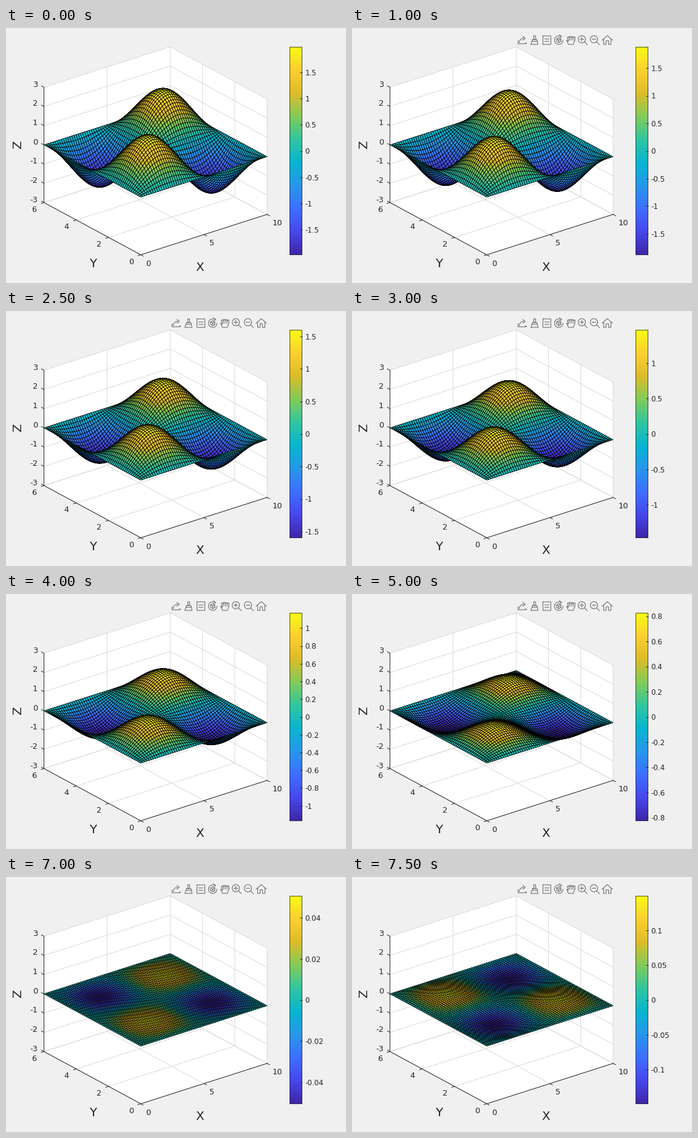
A matplotlib script that plays this animation: 560x420 px, repeating every 8000 ms.

```python
import numpy as np
import matplotlib.pyplot as plt
from matplotlib.animation import FuncAnimation
from matplotlib.collections import LineCollection, PolyCollection
from matplotlib.colors import LinearSegmentedColormap
from matplotlib.patches import Polygon, Rectangle

W, H, DPI = 560, 420, 100
PX = 72 / DPI                      # one pixel in points
FRAMES, INTERVAL = 16, 500
LX, LY, ZMAX, N = 10, 6, 3, 60
BG, INK, GRID, ICON = "#f0f0f0", "#262626", "#dadada", "#6e6e6e"

PARULA = LinearSegmentedColormap.from_list("parula", [
    "#3e26a8", "#4747eb", "#3e6fff", "#2797eb", "#08b5d0",
    "#31c69f", "#81cc59", "#dcbd29", "#fccf30", "#f9fb15"], N=256)

plt.rcParams["font.family"] = "DejaVu Sans"
fig = plt.figure(figsize=(W / DPI, H / DPI), dpi=DPI, facecolor=BG)
ax = fig.add_axes([0, 0, 1, 1])

# Orthographic projection: screen vectors of the three box edges
ORIGIN = np.array([222.0, 373.5])
EX = np.array([208.0, -66.5])
EY = np.array([-159.5, -86.0])
EZ = np.array([0.0, -190.0])


def project(x, y, z):
    x, y, z = (np.asarray(v, float)[..., None] for v in (x, y, z))
    return ORIGIN + x / LX * EX + y / LY * EY + (z + ZMAX) / (2 * ZMAX) * EZ


def line(points, color=INK, width=1.0, z=1):
    xs, ys = zip(*points)
    return ax.plot(xs, ys, color=color, lw=width * PX, zorder=z, snap=False,
                   solid_joinstyle="round")[0]


def edge(a, b, color=GRID, z=1):
    line([project(*a), project(*b)], color, 1, z)


def label(pos, text, size, ha="center"):
    """Text whose digits are centred vertically on pos."""
    return ax.text(pos[0], pos[1] + 0.365 * size, text, fontsize=size * PX,
                   color=INK, ha=ha, va="baseline", zorder=6)


def draw_box():
    lo, hi = -ZMAX, ZMAX
    floor = [(0, 0, lo), (LX, 0, lo), (LX, LY, lo), (0, LY, lo)]
    left = [(0, LY, lo), (LX, LY, lo), (LX, LY, hi), (0, LY, hi)]
    right = [(LX, 0, lo), (LX, LY, lo), (LX, LY, hi), (LX, 0, hi)]
    for wall in (floor, left, right):
        ax.add_patch(Polygon([project(*p) for p in wall], fc="white",
                             ec="none", zorder=0))
    unit_x, unit_y = (v / np.hypot(*v) for v in (EX, EY))

    def tick(p, step, text, offset, ha):
        line([p, p + 4.7 * step], z=2)
        label(p + offset, text, 13, ha)

    for x in (0, 5, 10):
        edge((x, 0, lo), (x, LY, lo))
        edge((x, LY, lo), (x, LY, hi))
        tick(project(x, 0, lo), -unit_y, str(x), (8.5, 13.5), "left")
    for y in (0, 2, 4, 6):
        edge((0, y, lo), (LX, y, lo))
        edge((LX, y, lo), (LX, y, hi))
        tick(project(0, y, lo), -unit_x, str(y), (-16, 10.5), "center")
    for z in range(lo, hi + 1):
        edge((0, LY, z), (LX, LY, z))
        edge((LX, 0, z), (LX, LY, z))
        tick(project(0, LY, z), unit_y, str(z), (-10.5, -5.5), "right")

    edge((0, 0, lo), (LX, 0, lo), INK, 2)
    edge((0, 0, lo), (0, LY, lo), INK, 2)
    edge((0, LY, lo), (0, LY, hi), INK, 2)
    label((319, 392.5), "X", 20)
    label((143, 386.5), "Y", 20)
    ax.text(19.5, 192.5, "Z", fontsize=20 * PX, color=INK, rotation=90,
            ha="center", va="center", zorder=6)


# Colour bar
CB_L, CB_R, CB_T, CB_B = 467.5, 487.5, 31.5, 373.5
CB_MID, CB_HALF = (CB_T + CB_B) / 2, (CB_B - CB_T) / 2


def draw_colorbar():
    ax.imshow(np.linspace(1, 0, 256)[:, None], cmap=PARULA, aspect="auto",
              extent=(CB_L - 0.5, CB_R + 0.5, CB_B + 0.5, CB_T - 0.5),
              interpolation="nearest", zorder=3)
    ax.add_patch(Rectangle((CB_L, CB_T), CB_R - CB_L, CB_B - CB_T, fill=False,
                           ec=INK, lw=0.8 * PX, snap=False, zorder=4))
    ticks = LineCollection([], colors=INK, linewidths=PX, zorder=5)
    ax.add_collection(ticks, autolim=False)
    return ticks, [label((492.5, 0), "", 12, "left") for _ in range(13)]


def update_colorbar(top):
    step = next(s for s in (0.02, 0.05, 0.1, 0.2, 0.5)
                if CB_HALF * s / top >= 28)
    count = int(top / step)
    values = step * np.arange(-count, count + 1)
    ys = CB_MID - values / top * CB_HALF
    cb_ticks.set_segments([[(CB_R - 3.5, y), (CB_R, y)] for y in ys])
    for text in cb_labels:
        text.set_text("")
    for text, v, y in zip(cb_labels, values, ys):
        text.set_text(f"{round(v, 2) + 0.0:g}")
        text.set_y(y + 0.5 + 0.365 * 12)


def draw_toolbar():
    """Row of tool icons, each drawn around its own centre."""
    parts = []

    def stroke(cx, *points):
        parts.append(line([(cx + x, 20 + y) for x, y in points], ICON, 1.1, 7))

    def arc(cx, x, y, r, start=0, stop=360, n=24):
        a = np.radians(np.linspace(start, stop, n + 1))
        stroke(cx, *zip(x + r * np.cos(a), y + r * np.sin(a)))

    def box(cx, x0, y0, x1, y1):
        stroke(cx, (x0, y0), (x1, y0), (x1, y1), (x0, y1), (x0, y0))

    share, brush, tip, turn, hand, zoom_in, zoom_out, home = (
        280.5 + 20 * np.arange(8))

    arc(share, 2, 4, 7, 180, 270, 8)
    stroke(share, (1, -6), (5, -3), (1, 0))
    stroke(share, (-7, 1), (-7, 6), (4, 6))
    stroke(share, (5, 5), (7, 5), (6, 6), (5, 5))

    box(brush, -1, -7, 2, -1)
    stroke(brush, (-3, -1), (4, -1), (6, 7), (-6, 7), (-3, -1))
    stroke(brush, (-4, 2), (5, 2))

    box(tip, -6, -7, 7, 7)
    for y in (-2, 2):
        stroke(tip, (-3, y), (4, y))

    arc(turn, 0, 0, 7, 0, 290)
    stroke(turn, (1, -9), (5, -6), (2, -4))
    arc(turn, 0, 0, 4, 30, 390, 6)
    for a in np.radians((90, 210, 330)):
        stroke(turn, (0, 0), (4 * np.cos(a), 4 * np.sin(a)))

    for x in (-4, -1, 2, 5):
        arc(hand, x, -5 + abs(x) / 4, 1.5, 180, 360, 6)
        stroke(hand, (x + 1.5, -5), (x + 1.5, 0))
    stroke(hand, (-5.5, -4), (-4, 2), (-7, 0), (-4, 7), (4, 7), (6.5, 0))

    for cx in (zoom_in, zoom_out):
        arc(cx, -2, -1.5, 6)
        stroke(cx, (2.3, 2.8), (7, 7.5))
        stroke(cx, (-5, -1.5), (1, -1.5))
    stroke(zoom_in, (-2, -4.5), (-2, 1.5))

    stroke(home, (-8.5, 0), (0, -7.5), (8.5, 0))
    stroke(home, (-6, -2), (-6, 7), (-2, 7), (-2, 1), (2, 1), (2, 7), (6, 7),
           (6, -2))
    return parts


draw_box()
cb_ticks, cb_labels = draw_colorbar()
toolbar = draw_toolbar()

gx, gy = np.meshgrid(np.linspace(0, LX, N), np.linspace(0, LY, N))
mode = np.sin(2 * np.pi * gx / LX) * np.sin(2 * np.pi * gy / LY)
surface = PolyCollection([], edgecolors="black", linewidths=0.8 * PX,
                         joinstyle="round", zorder=3)
ax.add_collection(surface, autolim=False)

ax.set_xlim(0, W)
ax.set_ylim(H, 0)
ax.axis("off")


def update(k):
    z = 2 * np.cos(0.1455 + 0.1 * k) * mode
    top = np.abs(z).max()
    p = project(gx, gy, z)
    quads = np.stack([p[:-1, :-1], p[:-1, 1:], p[1:, 1:], p[1:, :-1]], axis=2)
    # far cells first
    surface.set_verts(quads[::-1, ::-1].reshape(-1, 4, 2))
    shade = (z[:-1, :-1] / top + 1) / 2
    surface.set_facecolor(PARULA(shade[::-1, ::-1].ravel()))
    update_colorbar(top)
    for part in toolbar:
        part.set_visible(k > 0)
    return [surface]


anim = FuncAnimation(fig, update, frames=FRAMES, interval=INTERVAL,
                     repeat=True, repeat_delay=0, blit=False)
plt.show()
```
